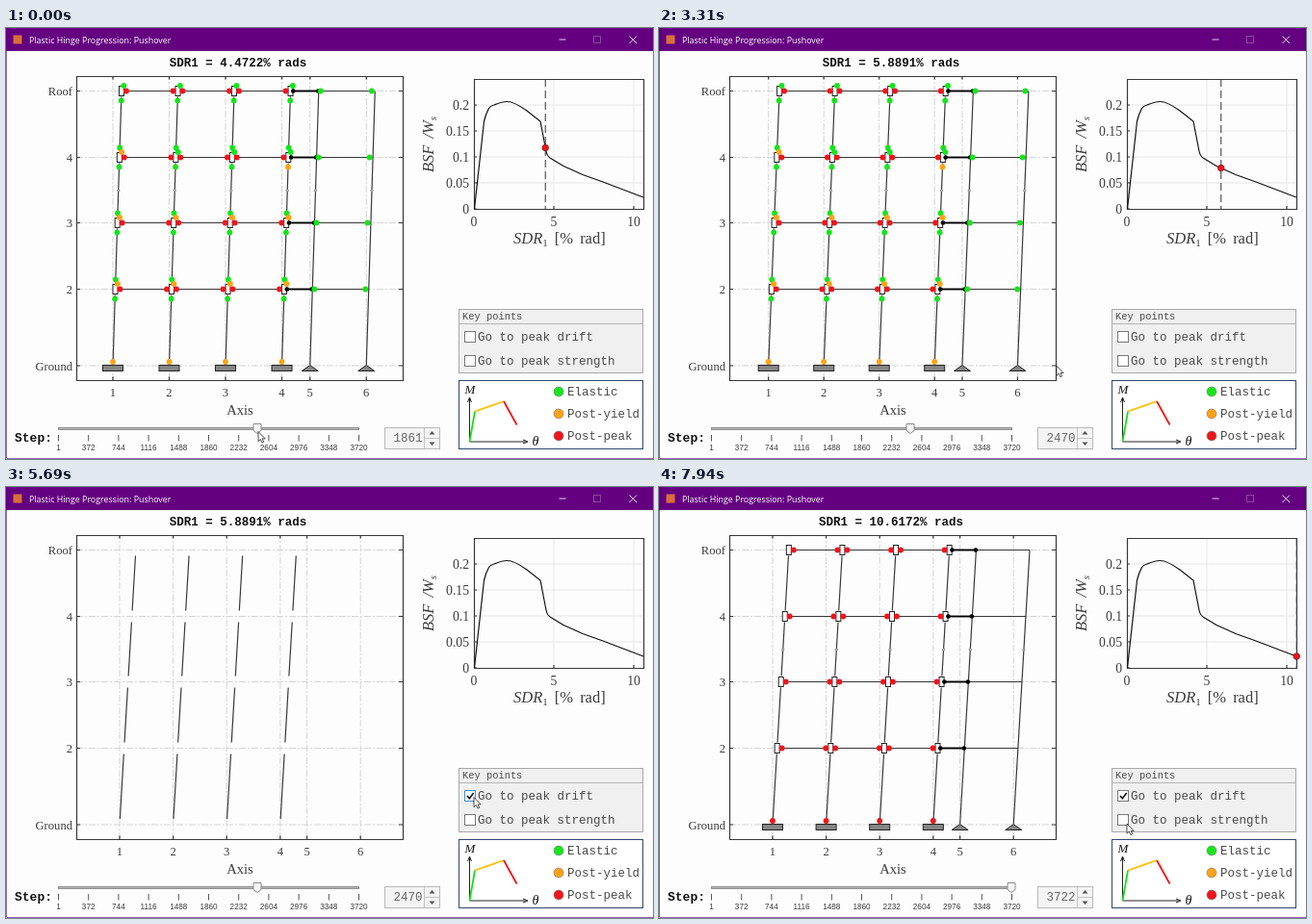
Animation of 672 by 448 pixels, one loop 8000 ms. Source, as an HTML page:

```html
<!DOCTYPE html>
<html lang="en">
<head>
<meta charset="utf-8">
<title>Plastic Hinge Progression</title>
<style>
html, body { margin: 0; width: 100%; height: 100%; overflow: hidden; background: #fdfdfd; }
svg { display: block; width: 100vw; height: 100vh; }
text { fill: #3c3c3c; }
.serif { font: 12.6px "Liberation Serif", serif; }
.num { font: 13.7px "Liberation Serif", serif; }
.mono { font: 12.5px "Liberation Mono", monospace; fill: #4a4a4a; }
.bold { font-weight: bold; }
.tick { font: 8.2px "Liberation Sans", sans-serif; }
.mid { text-anchor: middle; }
.end { text-anchor: end; }
.it { font-style: italic; }
.line { fill: none; stroke: #383838; stroke-width: 1.2; }
.grid { fill: none; stroke: #d4d4d4; stroke-dasharray: 7 2 2 2; }
.box { fill: #fff; stroke: #222; }
</style>
</head>
<body>
<svg viewBox="0 0 672 448" preserveAspectRatio="none">
  <rect width="672" height="448" fill="#fdfdfd"/>
  <path d="M.5 20V447.5H672" fill="none" stroke="#8c6aa8"/>
  <rect width="672" height="24" fill="#640080"/>
  <rect x="7.500" y="7.500" width="9" height="9" fill="#d8703a"/>
  <text x="24" y="15.500" style="font:8.88px 'Open Sans',sans-serif;fill:#fff">Plastic Hinge Progression: Pushover</text>
  <path d="M574.500 12H581.500M647.500 8.500L655 16M655 8.500L647.500 16" stroke="#f4eaf8" stroke-width=".9" fill="none"/>
  <rect x="610.500" y="8.500" width="7" height="7" fill="none" stroke="#8c45a0"/>

  <g id="frame"></g>
  <g id="curve"></g>
  <g id="slider"></g>

  <rect x="470.500" y="292.500" width="191" height="66" fill="#f0f0f0" stroke="#a8a8a8"/>
  <path d="M471 307.500H661" stroke="#b4b4b4"/>
  <text class="mono" x="474" y="303" style="font-size:10.4px">Key points</text>
  <rect id="check" x="476.500" y="315.500" width="11" height="11" fill="#fff" stroke="#777"/>
  <path data-on="4500-8000" d="M479 321L481.300 323.800L485.700 318" fill="none" stroke="#111" stroke-width="1.500"/>
  <rect x="476.500" y="340.500" width="11" height="11" fill="#fff" stroke="#777"/>
  <text class="mono" x="490" y="324.500">Go to peak drift</text>
  <text class="mono" x="490" y="349.500">Go to peak strength</text>

  <rect x="470.500" y="366.500" width="191" height="71" fill="#fff" stroke="#33476f"/>
  <path d="M481.500 430V385M479.500 389L481.500 384L483.500 389M481.500 430H541M537 428L542 430L537 432" fill="none" stroke="#222"/>
  <g fill="none" stroke-width="1.800">
    <path d="M481.500 430L487 398.500" stroke="#18e018"/>
    <path d="M487 398.500L517 388" stroke="#ffbe00"/>
    <path d="M517 388L530.500 412.500" stroke="#f01414"/>
  </g>
  <text class="serif it mid" x="482" y="380" style="font-size:13px;fill:#111">M</text>
  <text class="serif it mid" x="550" y="434" style="font-size:14px;fill:#111">θ</text>
  <g id="legend"></g>
  <path id="cursor" d="M0 0V10.200L2.300 8L4 11.600L5.700 10.800L4.100 7.400H7.200Z" fill="#fff" stroke="#222" stroke-width=".8"/>
</svg>
<script>
const LOOP = 8000;
const GREEN = '#14e61a', ORANGE = '#ffa216', RED = '#f0141c';
const GROUND = 351, LEVELS = [271.5, 202.5, 134.5, 65.5];

// start: redraw begins; gap: time between redraw steps; done: hinges appear; mark: curve marker
const poses = [
  { x: 111, bay: 58.5, sway: 9, sdr: 4.4722, step: 1861, bsf: 124.5, start: 0, gap: 0, sup: 0, done: 0, dash: 0, mark: 0, end: 1380 },
  { x: 113.7, bay: 57.5, sway: 11.4, sdr: 5.8891, step: 2470, bsf: 145.5, start: 1380, gap: 83, sup: 2310, done: 2310, dash: 2380, mark: 2440, end: 5690 },
  { x: 118, bay: 55.6, sway: 16.8, sdr: 10.6172, step: 3722, bsf: 176, start: 5690, gap: 88, sup: 6380, done: 6460, dash: 6540, mark: 6630, end: LOOP }
];

const $ = id => document.getElementById(id);
const text = (x, y, s, cls) => `<text class="${cls}" x="${x}" y="${y}">${s}</text>`;
const path = (d, cls = 'line', more = '') => `<path class="${cls}" d="${d}" ${more}/>`;
const seg = (x1, y1, x2, y2) => `M${x1} ${y1}L${x2} ${y2}`;
const dot = (x, y, fill, r = 2.9) => `<circle cx="${x}" cy="${y}" r="${r}" fill="${fill}"/>`;
const during = (from, to, body) => `<g data-on="${from}-${to}">${body}</g>`;

function hinges(p, axis, at) {
  const last = p === poses[2];
  let s = '';
  for (let c = 0; c < 4; c++) {
    s += dot(axis[c], 347, last ? RED : ORANGE);
    LEVELS.forEach((y, l) => {
      const x = at(c, y);
      if (!last) {
        if (l < 3) s += dot(at(c, y - 10), y - 10, GREEN);
        s += dot(at(c, y + 10), y + 10, l === 2 && c === 3 ? ORANGE : GREEN);
        s += dot(x + 2.4, y - 5.5, l < 2 || (l === 2 && c === 0) ? ORANGE : GREEN);
      }
      if (c > 0) s += dot(x - 5, y, RED);
      if (c < 3) s += dot(x + 5, y, RED);
    });
  }
  if (!last) for (const y of LEVELS) s += dot(at(4, y) + 2, y, GREEN) + dot(at(5, y) - 3.5, y, GREEN);
  return s;
}

function building(p) {
  const axis = [0, 1, 2, 3, 3.5, 4.5].map(k => p.x + k * p.bay);
  const at = (c, y) => axis[c] + p.sway * (GROUND - y) / 285;
  const member = (c, y1, y2) => seg(at(c, y1), y1, at(c, y2), y2);
  let grid = '', ticks = '', labels = '', cols = '', beams = '', links = '', boxes = '', splices = '', sup = '';
  axis.forEach((x, c) => {
    grid += `M${x} 366V50`;
    ticks += `M${x} 366v-3.500M${x} 50v3.500`;
    labels += text(x, 383, c + 1, 'serif mid');
    splices += `<circle cx="${at(c, 169)}" cy="169" r="1.300" fill="#bbb" stroke="#777" stroke-width=".6"/>`;
    sup += c < 4
      ? `<rect x="${x - 10.5}" y="350.500" width="21" height="6" fill="#858585" stroke="#222"/>`
      : path(`M${x} 350.500L${x + 8.5} 356.500H${x - 8.5}Z`, '', 'fill="#858585" stroke="#222"');
    if (c > 3) return;
    [GROUND, ...LEVELS].slice(0, 4).forEach((y, l) => cols += member(c, y - 6, LEVELS[l] + 6));
  });
  for (const y of LEVELS) {
    for (let c = 0; c < 3; c++) beams += seg(at(c, y), y, at(c + 1, y), y);
    beams += seg(at(4, y), y, at(5, y), y);
    const a = at(3, y) + 2.8, b = at(4, y) - .5;
    links += path(seg(a, y, b, y), '', 'stroke="#000" stroke-width="1.900"') + dot(a, y, '#000', 2.3) + dot(b, y, '#000', 2.3);
    for (let c = 0; c < 4; c++)
      boxes += `<rect class="box" x="${at(c, y) - 2.5}" y="${y - 5}" width="5" height="10"/>`;
  }
  const lean = member(4, 350, 66) + member(5, 350, 66);
  const stages = [
    path(grid, 'grid') + path(ticks) + labels + path(cols),
    path(lean), splices, path(beams), boxes, links
  ];
  return stages.map((s, k) => during(p.start + k * p.gap, p.end, s)).join('')
    + during(p.sup, p.end, sup) + during(p.done, p.end, hinges(p, axis, at));
}

const nextAt = (i, key, lag = 0) => i < 2 ? poses[i + 1][key] + lag * poses[i + 1].gap : LOOP;

const rows = [...LEVELS, GROUND];
$('frame').innerHTML =
  path(rows.map(y => `M73 ${y}H412`).join(''), 'grid')
  + poses.map(building).join('')
  + path('M73.500 50.500H412.500V366.500H73.500Z' + rows.map(y => `M73 ${y}h4M412 ${y}h-4`).join(''))
  + rows.map((y, i) => text(69, y + 4.5, ['2', '3', '4', 'Roof', 'Ground'][i], 'serif end')).join('')
  + text(243, 402, 'Axis', 'serif mid" style="font-size:14.5px')
  + poses.map((p, i) => during(p.done, nextAt(i, 'done'),
      text(241, 40, `SDR1 = ${p.sdr}% rads`, 'mono bold mid" style="fill:#111'))).join('');

const px = v => 486 + v * 16.6, py = v => 188 - v * 540;
const yTicks = [0, .05, .1, .15, .2];
$('curve').innerHTML =
  path(yTicks.slice(1).map(v => `M486 ${py(v)}H662`).join('') + [5, 10].map(v => `M${px(v)} 53V188`).join(''), '', 'stroke="#e6e6e6"')
  + path('M486.500 53.500H662.500V188.500H486.500Z' + yTicks.map(v => `M486 ${py(v)}h3`).join('') + [5, 10].map(v => `M${px(v)} 188v-3`).join(''))
  + yTicks.map(v => text(481, py(v) + 4.6, v, 'num end')).join('')
  + [0, 5, 10].map(v => text(px(v), 206, v, 'num mid')).join('')
  + path('M486.500 188L496.500 97Q498 90 501.500 83.500Q503 81 507 80C513 77.500 516 76.500 520.500 76.500C527 76.500 534 81 541 86L555 97L561 128Q562 133 565 135L579 143.500L588 147.500L599 152.500L620 160L662 176', 'line', 'style="stroke:#111"')
  + text(527, 224, '<tspan class="it">SDR</tspan><tspan font-size="11" dy="3">1</tspan><tspan dy="-3" dx="7">[%</tspan><tspan dx="3"> rad]</tspan>', 'serif" style="font-size:16.5px')
  + `<g transform="translate(444 150) rotate(-90)">${text(0, 0, 'BSF<tspan dx="7">/W</tspan><tspan font-size="11" dy="3">s</tspan>', 'serif it" style="font-size:16.5px')}</g>`
  + poses.map(p => during(p.dash, p.end, path(`M${px(p.sdr)} 53V188`, '', 'stroke="#444" stroke-width="1.100" stroke-dasharray="8 4"'))
      + during(p.mark, p.end, `<circle cx="${px(p.sdr)}" cy="${p.bsf}" r="3.300" fill="${RED}" stroke="#7a1010" stroke-width=".7"/>`)).join('');

const thumb = x => path(`M${x - 4} 411.500h8v7l-4 3l-4 -3Z`, '', 'fill="#f6f6f6" stroke="#8a8a8a"');
const marks = [...Array(11).keys()];
const moved = poses[2].start + 2 * poses[2].gap;
$('slider').innerHTML =
  text(9, 430, 'Step:', 'mono bold" style="font-size:13px;fill:#111')
  + '<rect x="54.500" y="415.500" width="312" height="2" fill="#b8b8b8" stroke="#8e8e8e"/>'
  + path(marks.map(k => `M${54.5 + k * 31.2} 423v6.500`).join(''), '', 'stroke="#555"')
  + marks.map(k => text(54.5 + k * 31.2, 439, k * 372 || 1, 'tick mid')).join('')
  + during(0, moved, thumb(261)) + during(moved, LOOP, thumb(366))
  + '<rect x="393.500" y="415.500" width="57" height="22" fill="#f4f4f4" stroke="#b8b8b8"/>'
  + path('M434.500 416V437M435 426.500H450', '', 'stroke="#c4c4c4"')
  + path('M439.500 422.500L442.500 419L445.500 422.500ZM439.500 430.500L442.500 434L445.500 430.500Z', '', 'fill="#555"')
  + poses.map((p, i) => during(p.start + 2 * p.gap, nextAt(i, 'start', 2),
      text(417.5, 430, p.step, 'mono mid" style="fill:#666'))).join('');

$('legend').innerHTML = [['Elastic', GREEN], ['Post-yield', ORANGE], ['Post-peak', RED]].map(([s, c], i) =>
  `<circle cx="574" cy="${378 + i * 23}" r="5" fill="${c}" stroke="#777" stroke-width=".6"/>`
  + text(583, 382 + i * 23, s, 'mono')).join('');

// cursor path: time, x, y
const track = [
  [0, 262, 419.5], [2950, 262, 419.5], [3150, 330, 389], [3350, 433, 342], [3500, 500, 317],
  [3580, 511, 313], [3680, 494, 319], [3750, 486, 322.5], [7330, 486, 322.5],
  [7520, 496, 332], [7700, 498, 343], [7850, 490, 350], [7940, 486, 350], [LOOP, 486, 350]
];
function cursorAt(t) {
  const i = track.findIndex(k => k[0] > t), [t0, x0, y0] = track[i - 1], [t1, x1, y1] = track[i];
  const f = (t - t0) / (t1 - t0);
  return `translate(${x0 + (x1 - x0) * f} ${y0 + (y1 - y0) * f})`;
}

const timed = [...document.querySelectorAll('[data-on]')].map(el => [el, ...el.dataset.on.split('-').map(Number)]);
const begin = performance.now();
function tick() {
  const t = Math.max(0, performance.now() - begin) % LOOP;
  for (const [el, from, to] of timed) el.style.display = t >= from && t < to ? '' : 'none';
  $('cursor').setAttribute('transform', cursorAt(t));
  const hover = t >= 3700 && t < 7520, press = t >= 4500 && t < 4560;
  $('check').setAttribute('stroke', hover ? '#4a90c8' : '#777');
  $('check').setAttribute('fill', press ? '#cce4f7' : hover ? '#f3f9ff' : '#fff');
  requestAnimationFrame(tick);
}
tick();
</script>
</body>
</html>
```
